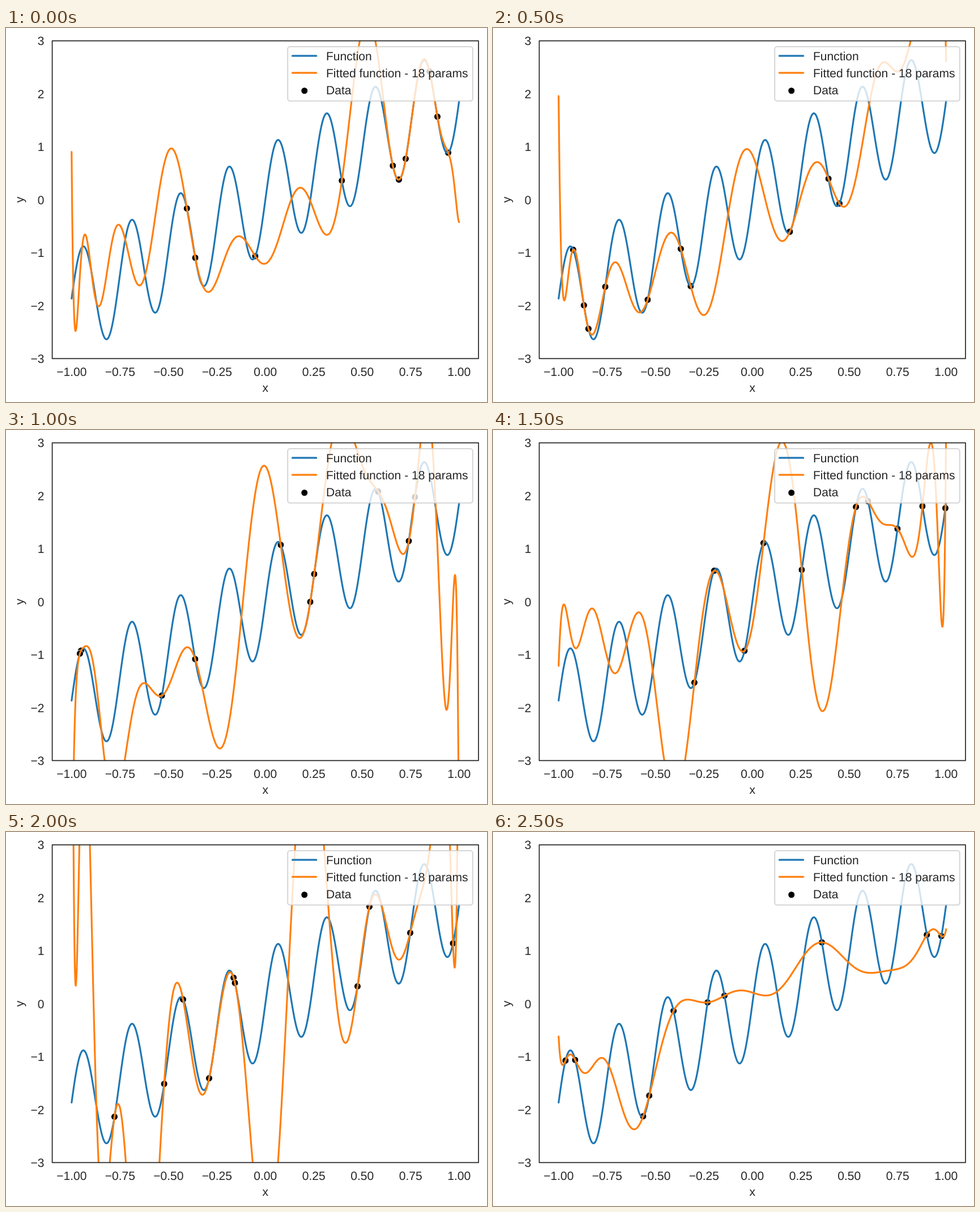
Recreate the animation shown at these times as an HTML page with a canvas. Size 849x660 px, loop 3 s.

```html
<!DOCTYPE html>
<html lang="en">
<head>
<meta charset="utf-8">
<title>Polynomial fits</title>
<style>
html, body { margin: 0; width: 100%; height: 100%; overflow: hidden; background: #fff; }
canvas { display: block; }
</style>
</head>
<body>
<canvas id="stage" width="849" height="660"></canvas>
<script>
const ctx = document.getElementById('stage').getContext('2d');
const PARAMS = 18, HOLD = 500;
const BLUE = '#1f77b4', ORANGE = '#ff7f0e', INK = '#262626';
const BOX = [81.6, 22.7, 752.4, 560.6];

const toPx = x => 457.8 + 342 * x, toPy = y => 303 - 93.43 * y;
const fromPx = px => (px - 457.8) / 342;
const truth = x => 2 * x + Math.sin(25 * x);
const inner = (a, b) => a.reduce((sum, v, i) => sum + v * b[i], 0);

// Legendre polynomials of degree 1 to PARAMS
function features(x) {
  const p = [1, x];
  for (let n = 1; n < PARAMS; n++)
    p.push(((2 * n + 1) * x * p[n] - n * p[n - 1]) / (n + 1));
  return p.slice(1);
}

// Gaussian elimination for a symmetric positive definite matrix
function solve(a, b) {
  const n = b.length;
  for (let i = 0; i < n; i++)
    for (let r = i + 1; r < n; r++) {
      const k = a[r][i] / a[i][i];
      for (let c = i; c < n; c++) a[r][c] -= k * a[i][c];
      b[r] -= k * b[i];
    }
  for (let i = n - 1; i >= 0; i--) {
    for (let c = i + 1; c < n; c++) b[i] -= a[i][c] * b[c];
    b[i] /= a[i][i];
  }
  return b;
}

// Minimum-norm polynomial through the true function at the sampled columns
function fit(columns) {
  const dots = columns.map(fromPx);
  const rows = dots.map(features);
  const gram = rows.map(r => rows.map(s => inner(r, s)));
  const weights = solve(gram, dots.map(truth));
  const coef = rows[0].map((_, j) => inner(weights, rows.map(r => r[j])));
  return { dots, path: trace(x => inner(coef, features(x))) };
}

function trace(curve) {
  const path = new Path2D(), steps = 2000;
  for (let i = 0; i <= steps; i++) {
    const x = 2 * i / steps - 1;
    path.lineTo(toPx(x), toPy(curve(x)));
  }
  return path;
}

const truthPath = trace(truth);
const fits = [
  [319.3, 334.1, 440, 592.8, 682.8, 693.5, 705.5, 747.5, 761.5, 780.5],
  [141.5, 160.5, 168.5, 198.2, 273, 331.5, 349, 524, 592.2, 611.5],
  [132.5, 130.5, 275.2, 333.9, 485, 537.1, 544, 656.8, 711, 721.8],
  [355.5, 390.5, 444, 477.5, 545, 640.7, 662, 714, 758, 798.5],
  [191.5, 279.2, 312.5, 358.5, 401.7, 404.1, 620.5, 641.5, 713.5, 789],
  [128, 145, 265, 275.8, 318.7, 378.8, 408.6, 580.5, 765.8, 791.5],
].map(fit);

function stroke(path, color, width) {
  ctx.strokeStyle = color;
  ctx.lineWidth = width;
  ctx.stroke(path);
}

function dot(x, y) {
  const path = new Path2D();
  path.arc(x, y, 6, 0, 7);
  ctx.fillStyle = '#000';
  ctx.fill(path);
  stroke(path, '#fff', 1);
}

function text(label, x, y, align) {
  ctx.fillStyle = INK;
  ctx.textAlign = align;
  ctx.fillText(label, x, y);
}

function drawAxes() {
  const frame = new Path2D();
  frame.rect(...BOX);
  stroke(frame, INK, 1.7);
  const signed = (v, digits) => v.toFixed(digits).replace('-', '\u2212');
  for (let i = -4; i <= 4; i++) text(signed(i / 4, 2), toPx(i / 4), 613.5, 'center');
  for (let i = -3; i <= 3; i++) text(signed(i, 0), 67.5, toPy(i) + 7.7, 'right');
  text('x', 457.8, 641.5, 'center');
  ctx.save();
  ctx.translate(30.5, 303);
  ctx.rotate(-Math.PI / 2);
  text('y', 0, 0, 'center');
  ctx.restore();
}

function drawLegend() {
  const panel = new Path2D();
  panel.roundRect(497.2, 33, 326.6, 95.8, 4.2);
  ctx.fillStyle = 'rgba(255,255,255,0.8)';
  ctx.fill(panel);
  stroke(panel, 'rgba(204,204,204,0.8)', 2.1);
  [BLUE, ORANGE].forEach((color, i) => {
    const key = new Path2D();
    key.moveTo(505.6, 49.2 + 30 * i);
    key.lineTo(547.7, 49.2 + 30 * i);
    stroke(key, color, 3.16);
  });
  dot(526.8, 110.8);
  ['Function', `Fitted function - ${PARAMS} params`, 'Data'].forEach((label, i) =>
    text(label, 565, 57 + 30 * i, 'left'));
}

function draw() {
  const { dots, path } = fits[Math.floor(performance.now() / HOLD) % fits.length];
  ctx.fillStyle = '#fff';
  ctx.fillRect(0, 0, 849, 660);
  ctx.font = '21.07px "Liberation Sans", Arial, sans-serif';
  ctx.textRendering = 'geometricPrecision';
  ctx.lineCap = ctx.lineJoin = 'round';
  ctx.save();
  ctx.beginPath();
  ctx.rect(...BOX);
  ctx.clip();
  dots.forEach(x => dot(toPx(x), toPy(truth(x))));
  stroke(truthPath, BLUE, 3.16);
  stroke(path, ORANGE, 3.16);
  ctx.restore();
  drawAxes();
  drawLegend();
  requestAnimationFrame(draw);
}
draw();
</script>
</body>
</html>
```
